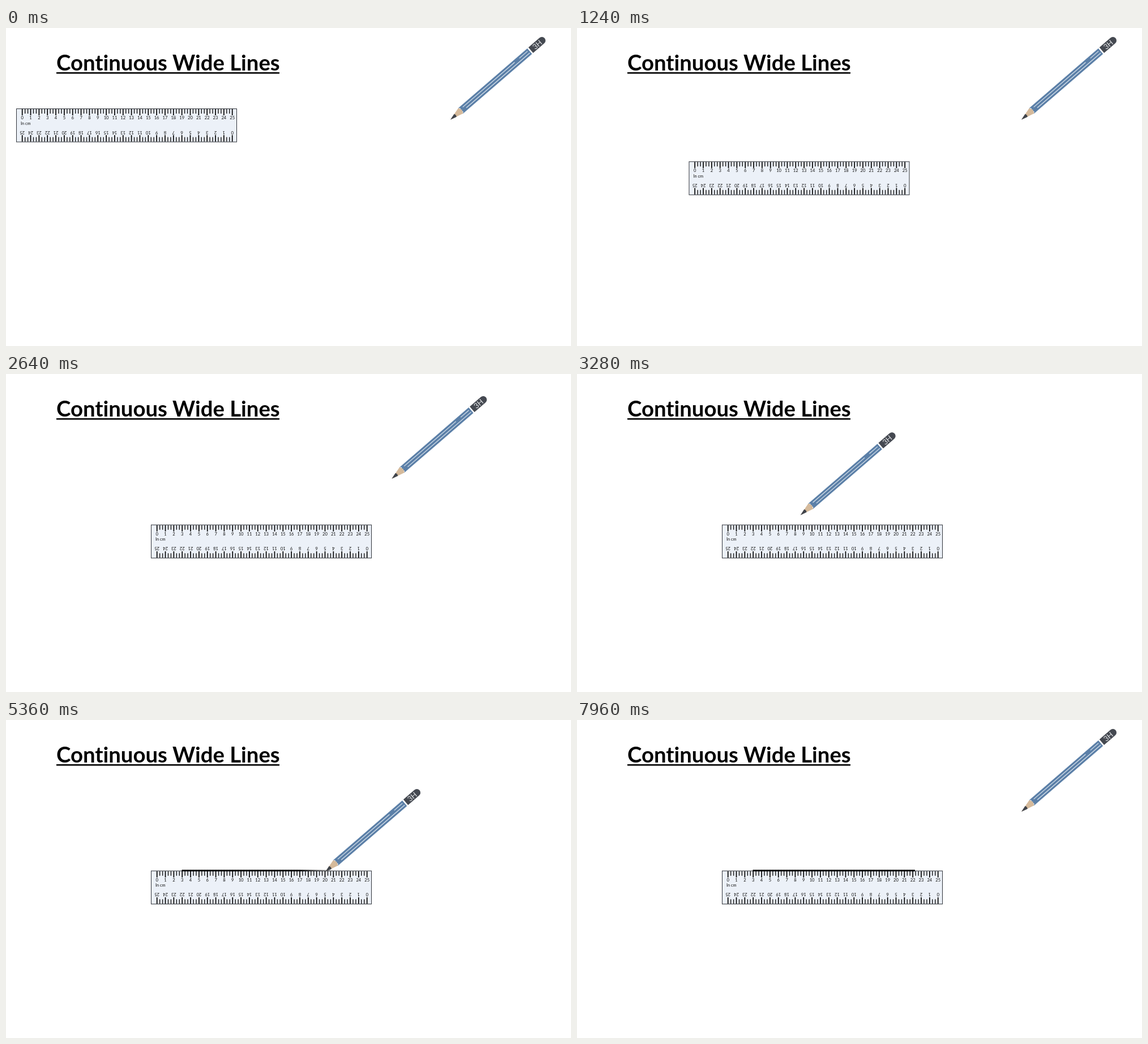
Recreate the animation shown at these times as an HTML page. Size 998 by 561 pixels, loop 8 s.

```html
<!DOCTYPE html>
<html lang="en">
<head>
<meta charset="utf-8">
<title>Continuous Wide Lines</title>
<style>
  html, body { margin: 0; width: 100%; height: 100%; overflow: hidden; background: #fff; }
  svg { display: block; font-family: Lato, Carlito, sans-serif; font-variant-ligatures: none; }
</style>
</head>
<body>
<svg width="998" height="561" viewBox="0 0 998 561">
  <defs>
    <linearGradient id="wipe" gradientUnits="userSpaceOnUse" y1="0" y2="0">
      <stop offset="0" stop-color="#000"/>
      <stop offset="1" stop-color="#000" stop-opacity="0"/>
    </linearGradient>
  </defs>

  <text x="89" y="74.8" font-size="38.3" font-weight="700">Continuous Wide Lines</text>
  <rect x="89" y="78" width="394" height="2.6"/>

  <g id="ruler">
    <rect x="18.5" y="142.5" width="389" height="58.5" fill="#ecf1f8" stroke="#30343b"/>
    <path id="minor" stroke="#111" stroke-width="1.4"/>
    <path id="major" stroke="#000" stroke-width="1.7"/>
    <g id="labels" font-size="7.6" text-anchor="middle" fill="#111"></g>
    <text x="26" y="170.8" font-size="7.4" fill="#111">In cm</text>
  </g>

  <rect id="line" x="310.5" y="264.2" width="286.5" height="2.9" fill="url(#wipe)"/>

  <!-- The pencil lies along the x axis with its tip at the origin. -->
  <g id="pencil">
    <g transform="translate(785 161.7) rotate(-40.8)">
      <path d="M0 0 L24 -6.4 L27 0 L24 6.4 Z" fill="#d5ba9b"/>
      <path d="M0 0 L11.5 -3.3 Q13.5 0 11.5 3.3 Z" fill="#40444b"/>
      <path d="M23.5 -6.4 H185 V6.4 H23.5 Q28 4 25.5 2 Q28 0 25.5 -2 Q28 -4 23.5 -6.4 Z" fill="#5c80a8"/>
      <path d="M31 -2.5 H152 M163 -2.5 H182 M35 2.5 H183" stroke="#dfe8f0" stroke-width="1.1"/>
      <path d="M187.5 -6.4 H213.5 A6.4 6.4 0 0 1 213.5 6.4 H187.5 Z" fill="#454951"/>
      <text x="202.5" y="4.6" font-size="13" text-anchor="middle" fill="#e4e6e8">3H</text>
    </g>
  </g>
</svg>
<script>
const LOOP = 8000, CM = 14.84, DIVISIONS = 3;
const $ = id => document.getElementById(id);

function buildRuler() {
  let major = '', minor = '', labels = '';
  for (let i = 0; i <= 25 * DIVISIONS; i++) {
    const x = (28.7 + i * CM / DIVISIONS).toFixed(2);
    if (i % DIVISIONS) {
      minor += `M${x} 143v8M${x} 200.5v-8`;
    } else {
      const cm = i / DIVISIONS;
      major += `M${x} 143v11M${x} 200.5v-11.5`;
      labels += `<text x="${x}" y="161.2">${cm}</text>
        <text transform="translate(${x} 181.7) rotate(180)">${25 - cm}</text>`;
    }
  }
  $('major').setAttribute('d', major);
  $('minor').setAttribute('d', minor);
  $('labels').innerHTML = labels;
}

const progress = (t, start, duration) => Math.min(1, Math.max(0, (t - start) / duration));
// Constant acceleration, then constant deceleration
const ease = p => p < .5 ? 2 * p * p : 1 - 2 * (1 - p) ** 2;
const move = (id, x, y) => $(id).setAttribute('transform', `translate(${x.toFixed(2)} ${y.toFixed(2)})`);

function drawLine(t) {
  const left = 310.5, width = 286.5, soft = .22;
  const p = progress(t, 4060, 1700);
  const front = left + width * p * (1 + soft);
  $('line').style.display = p > 0 ? '' : 'none';
  $('wipe').setAttribute('x1', front - width * soft);
  $('wipe').setAttribute('x2', front);
}

function render(t) {
  const slide = ease(progress(t, 85, 1780));
  move('ruler', 238 * slide, 123.7 * slide);

  const approach = ease(progress(t, 2072, 1722));
  const stroke = ease(progress(t, 4060, 1700));
  const leave = ease(progress(t, 5998, 1720));
  move('pencil', -474.5 * approach + 285 * stroke + 189.5 * leave, 106 * (approach - leave));

  drawLine(t);
}

function tick() {
  render(performance.now() % LOOP);
  requestAnimationFrame(tick);
}

buildRuler();
tick();
</script>
</body>
</html>
```
